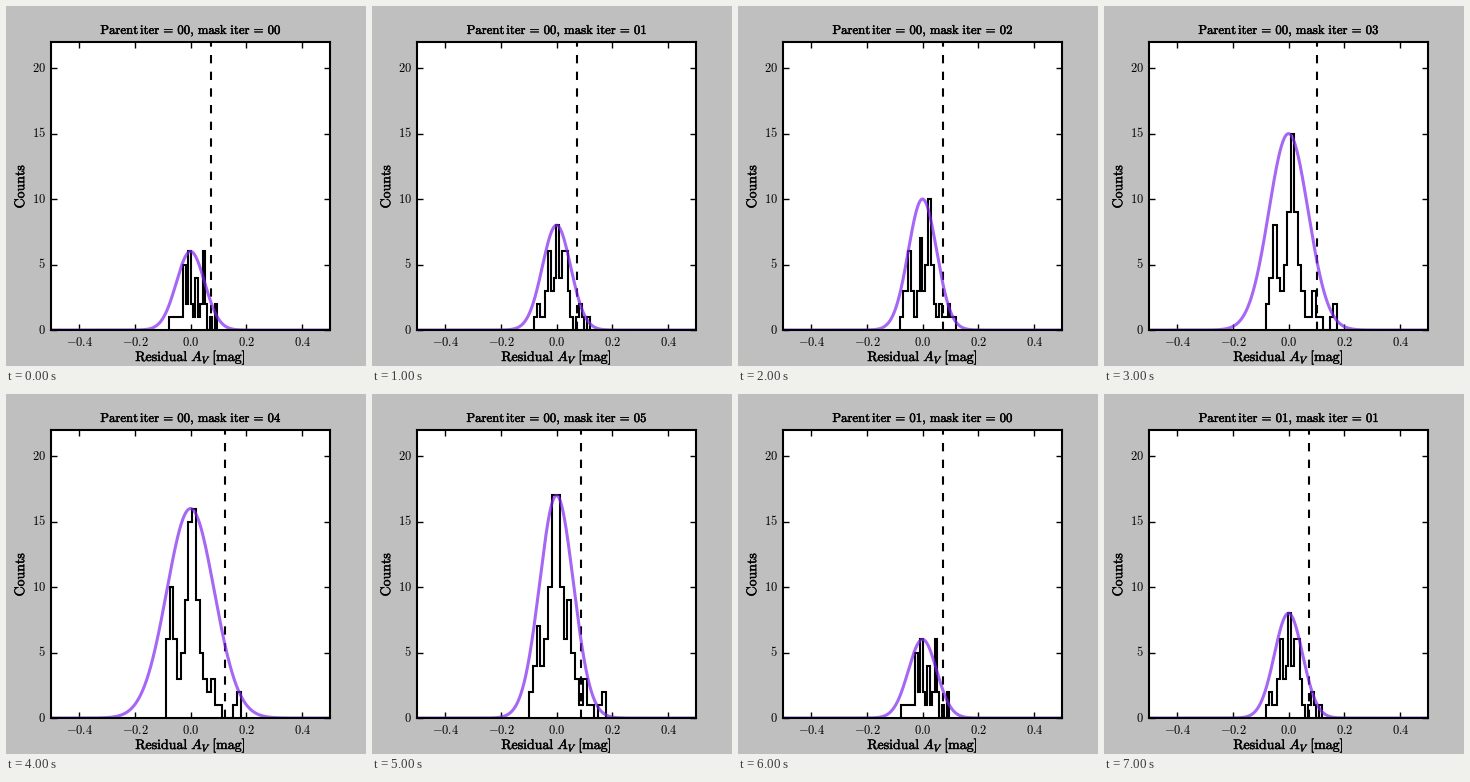
A matplotlib script for the animation above (8000 ms loop, 360 by 360 pixels).

```python
import numpy as np
import matplotlib.pyplot as plt
from matplotlib.animation import FuncAnimation
from matplotlib.patheffects import withStroke

SIZE = 360
BINS = 20
MASKS = 6
plt.rcParams["mathtext.fontset"] = "cm"

# Per mask iteration: cut, first and last edge (mag), fade per bin,
# and the histogram's peaks as {bin: count}
STEPS = [
    (0.0735, -0.077, 0.095, 0.35, {6: 5, 8: 6, 11: 4, 14: 6, 17: 1, 19: 2}),
    (0.0735, -0.081, 0.120, 0.5, {1: 2, 5: 6, 8: 8, 10: 6, 11: 6, 16: 2, 19: 1}),
    (0.0735, -0.081, 0.120, 0.5, {1: 3, 3: 6, 7: 7, 10: 10, 14: 2, 17: 2, 19: 1}),
    (0.1020, -0.081, 0.174, 0.6, {2: 8, 7: 15, 13: 3, 19: 2}),
    (0.1235, -0.088, 0.181, 0.6, {1: 10, 6: 15, 7: 16, 12: 3, 19: 2}),
    (0.0878, -0.099, 0.177, 0.6, {2: 7, 6: 17, 7: 17, 10: 9, 14: 3, 19: 2}),
]

fig = plt.figure(figsize=(SIZE / 100, SIZE / 100), dpi=100, facecolor="0.75")
ax = fig.add_axes([0.125, 0.1, 0.775, 0.8], facecolor="white")
ax.set_xlim(-0.5, 0.5)
ax.set_ylim(0, 22)
x_ticks = np.arange(-2, 3) / 5
y_ticks = np.arange(0, 21, 5)
ax.set_xticks(x_ticks)
ax.set_yticks(y_ticks)
ax.tick_params(direction="in", top=True, right=True, length=4, width=1,
               labelbottom=False, labelleft=False)
for spine in ax.spines.values():
    spine.set_linewidth(1.5)


def label(x, y, text, size=9, bold=False, **style):
    """Place text by pixel position, measured from the top left."""
    style = {"ha": "center", "va": "baseline", **style}
    if bold:
        style["path_effects"] = [withStroke(linewidth=0.3, foreground="black")]
    return fig.text(x / SIZE, 1 - y / SIZE, text, fontsize=size, **style)


for x in x_ticks:
    label(185 + 279 * x, 340, f"${x:.1f}$")
for y in y_ticks:
    label(39.5, 327.5 - 288 * y / 22, f"${y}$", ha="right")

label(184.5, 355, r"$\mathrm{Residual}\ A_V\ \mathrm{[mag]}$", 10, bold=True)
label(14.2, 180, r"$\mathrm{Counts}$", 10, bold=True, va="center", rotation=90)
title = label(185, 28, "", 9.2, bold=True)

mags = np.linspace(-0.5, 0.5, 1000)
bars, = ax.plot([], [], color="black", lw=1.5, solid_joinstyle="miter")
cut_line = ax.axvline(0, color="black", lw=1.5, dashes=(4, 4))
cut_line.set_dash_capstyle("butt")
bell, = ax.plot([], [], color="#8026f0", alpha=0.7, lw=2.2)


def histogram(peaks, fade):
    """Counts that fade away from each peak, with no gap before the highest."""
    bins = np.arange(BINS)
    counts = np.max([n * fade ** abs(bins - b) for b, n in peaks.items()], axis=0)
    counts = np.floor(counts)
    top = counts.argmax()
    counts[:top] = np.maximum(counts[:top], 1)
    return counts


def draw(i):
    parent, mask = divmod(i, MASKS)
    cut, left, right, fade, peaks = STEPS[mask]
    counts = histogram(peaks, fade)
    edges = np.linspace(left, right, BINS + 1)
    bars.set_data(np.repeat(edges, 2), [0, *np.repeat(counts, 2), 0])
    sigma = cut / 1.45
    bell.set_data(mags, counts.max() * np.exp(-0.5 * (mags / sigma) ** 2))
    cut_line.set_xdata([cut, cut])
    title.set_text(
        rf"$\mathrm{{Parent\,iter}}\,=\,\mathrm{{{parent:02d},\,mask\ iter}}"
        rf"\,=\,\mathrm{{{mask:02d}}}$")
    return bars, bell, cut_line, title


anim = FuncAnimation(fig, draw, frames=8, interval=1000,
                     init_func=lambda: draw(0), repeat=True, repeat_delay=0)
plt.show()
```
